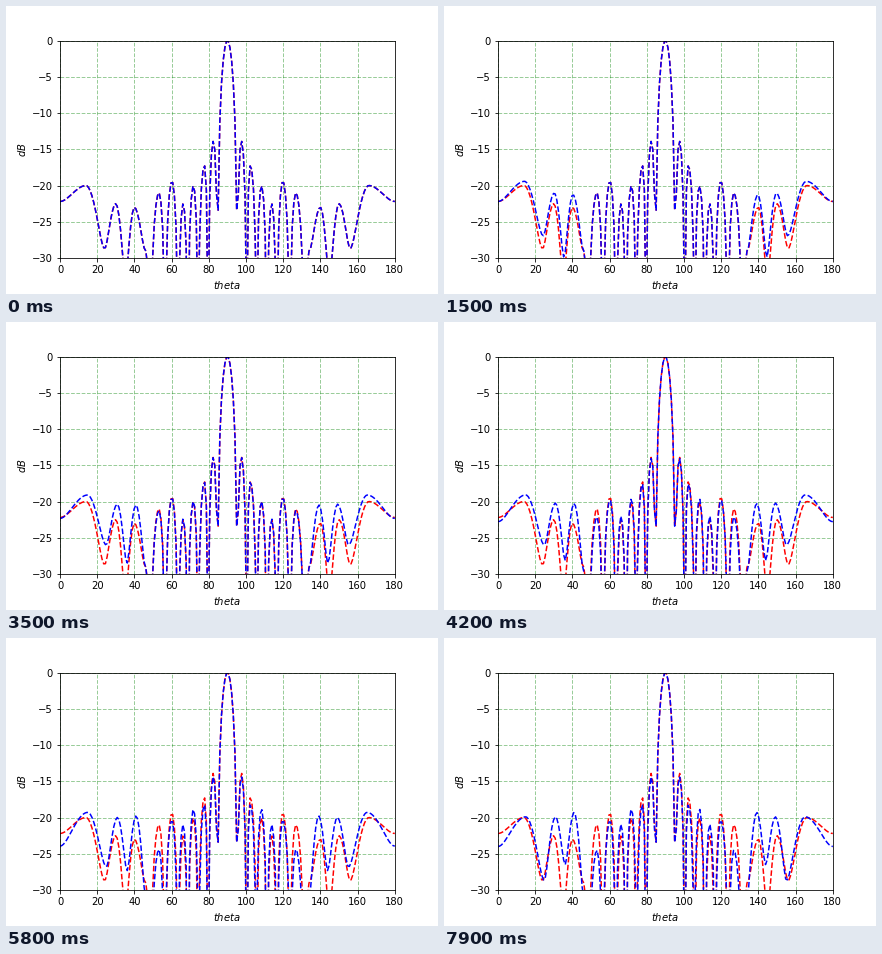
These frames come from a looping animation (432x288 px, 8 s). A matplotlib script:

```python
import numpy as np
import matplotlib.pyplot as plt
from matplotlib.animation import FuncAnimation

FRAMES, INTERVAL = 80, 100
NULL = 1.4303       # first sidelobe of sinc, where its value is SINC_MIN
SINC_MIN = -0.2172

# Turning points of the half pattern: angle, dB at the start, dB at the end
POINTS = [
    (0, -22.2, -24), (14, -20, -19.9), (24, -28.7, -28.7), (30, -22.5, -19.9),
    (35.2, -33, -26.5), (40, -23, -19.3), (46, -29, -31), (53.2, -21, -24.5),
    (60.2, -19.4, -20.4), (66.2, -22.5, -20.9), (71.7, -20, -18.8),
    (77.6, -17.2, -18.2), (82.4, -13.9, -14.4),
]
ANGLE, START, END = np.array(POINTS).T
KNOTS = np.arange(len(ANGLE))
SIGN = np.where(KNOTS < 7, 1, (-1) ** KNOTS)   # outer lobes never cross zero

# Runs of frames in which the pattern moves; it rests in between
RUNS = [(3, 19), (22, 23), (28, 35), (38, 43), (48, 64), (68, 68), (73, 79)]


def smooth(t):
    t = np.clip(t, 0, 1)
    return t * t * (3 - 2 * t)


def progress(frame):
    done = sum(np.clip(frame - a + 1, 0, b - a + 1) for a, b in RUNS)
    return done / sum(b - a + 1 for a, b in RUNS)


theta = np.linspace(0, 180, 200)
half = 90 - np.abs(theta - 90)


def pattern(p):
    # Lobes around 35 degrees rise early, the rest follow late
    early = (ANGLE > 24) & (ANGLE < 42)
    blend = np.where(early, np.sqrt(p), smooth((p - 0.4) / 0.4))
    lift = 3.5 * np.exp(-((ANGLE - 21) / 6) ** 2) * np.sin(np.pi * p)
    amp = 10 ** ((START + (END - START) * blend + lift) / 20)
    angle = ANGLE + 0.9 * smooth(p / 0.6) * ((ANGLE > 0) & (ANGLE < 42))

    pos = np.interp(half, angle, KNOTS)
    cell = np.floor(pos)
    side = np.interp(cell + smooth(pos - cell), KNOTS, SIGN * amp)

    main = np.sinc(NULL * (90 - half) / (90 - angle[-1]))
    main = np.where(main < 0, main * amp[-1] / SINC_MIN, main)
    level = np.abs(np.where(half < angle[-1], side, main))
    return 20 * np.log10(np.maximum(level, 1e-6))


fig, ax = plt.subplots(figsize=(6, 4), dpi=72)
fig.subplots_adjust(left=0.125, right=0.9, bottom=0.125, top=0.88)
ax.plot(theta, pattern(0), "r--", lw=1.5)
line, = ax.plot(theta, pattern(0), "b--", lw=1.5)
ax.set_xlim(0, 180)
ax.set_ylim(-30, 0)
ax.set_xticks(range(0, 181, 20))
ax.set_xlabel("$theta$")
ax.set_ylabel("$dB$")
ax.grid(color="g", ls="--", lw=1, alpha=0.4)


def update(frame):
    line.set_ydata(pattern(progress(frame)))
    return line,


anim = FuncAnimation(fig, update, frames=FRAMES, interval=INTERVAL, repeat=True)
plt.show()
```
